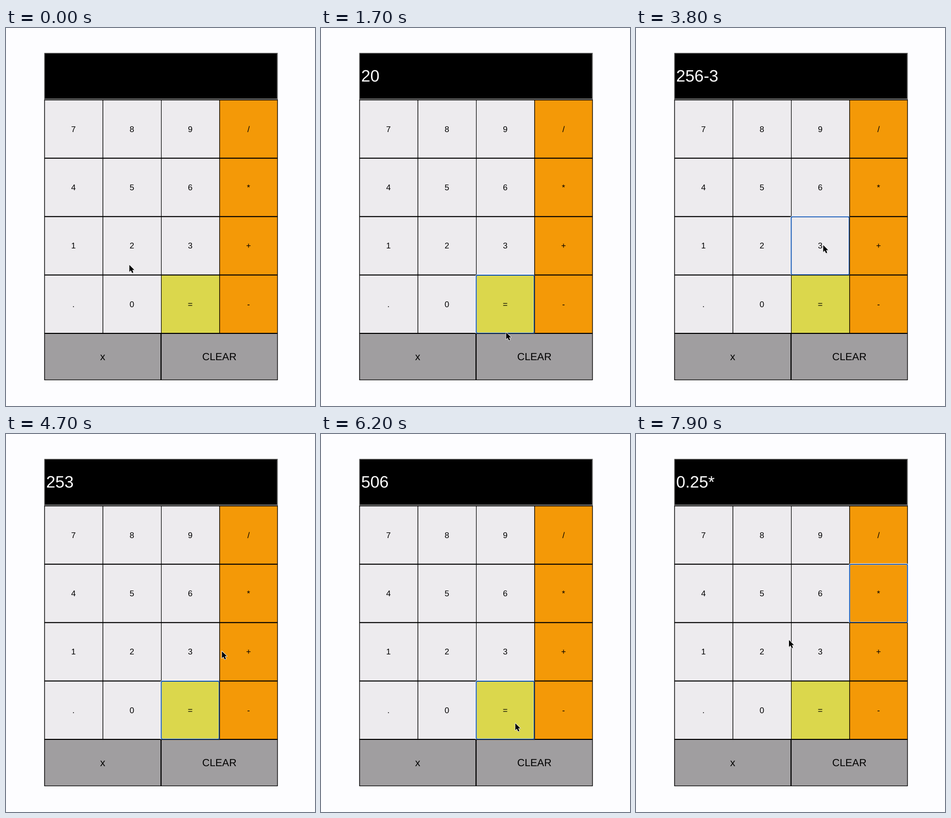
Write an HTML page that moves like this. It is 600 px wide and 734 px high and loops after 8 s.

```html
<!DOCTYPE html>
<html>
<head>
<meta charset="utf-8">
<title>Calculator</title>
<style>
  html, body { margin: 0; width: 100%; height: 100%; overflow: hidden; background: #fdfdff; }
  svg {
    display: block; width: 600px; height: 734px;
    font: 16px "Liberation Sans", Arial, sans-serif; text-rendering: geometricPrecision;
  }
  .label { text-anchor: middle; }
  .ring { fill: none; visibility: hidden; }
</style>
</head>
<body>
<svg id="stage" viewBox="0 0 600 734">
  <path d="M74.4 48.4H527.6V139H74.4Z" fill="#333"/>
  <path d="M527.6 48.4V139H74.4L76 137H526V50Z" fill="#777"/>
  <path d="M76 50H526V137H76Z"/>
  <text id="display" x="78" y="104" font-size="32" fill="#fff"></text>
  <path d="M74.4 139H527.6V683.7H74.4Z"/>
  <g id="keys"></g>
  <g id="cursor">
    <path d="M1 2V15L4 12.3 6.3 17.4 8.7 16.4 6.5 11.5H10.5Z" fill="#000" opacity=".15"/>
    <path d="M0 0V13.4L3 10.6 5.3 15.8 7.8 14.7 5.6 9.7H9.7Z" stroke="#fff" stroke-width="1.6" stroke-linejoin="round" paint-order="stroke"/>
  </g>
</svg>
<script>
const LOOP = 8000, STEP = 100;
const $ = id => document.getElementById(id);
const keys = {};

function add(parent, tag, attrs, text = '') {
  const el = document.createElementNS('http://www.w3.org/2000/svg', tag);
  for (const name in attrs) el.setAttribute(name, attrs[name]);
  el.textContent = text;
  return parent.appendChild(el);
}

function box(parent, x, y, width, height, attrs) {
  return add(parent, 'rect', { x, y, width, height, ...attrs });
}

// Later keys cover the outer part of an earlier key's focus ring.
function addKey(name, x, y, right, bottom, fill, size, end = 0) {
  const w = right - x, h = bottom - y, cx = x + w / 2, cy = y + h / 2;
  const g = add($('keys'), 'g', {});
  box(g, x, y, w, h, {});
  box(g, x + 1.1, y + 1, w - 1.1 - end, h - 2, { fill });
  const ring = add(g, 'g', { class: 'ring' });
  box(ring, x, y, w, h, { rx: 3, stroke: '#fff', 'stroke-width': 3 });
  box(ring, x + .4, y + .4, w - .8, h - .8, { rx: 2.5, stroke: '#1054b4', 'stroke-width': 1.8 });
  add(g, 'text', { class: 'label', x: cx, y: cy + size * .345, 'font-size': size }, name);
  keys[name] = { ring, x: cx + 5, y: cy - 1 };
}

const colX = i => 74.4 + 113.3 * i;
const rowY = j => 139.4 + 113.4 * j;
[...'789/456*123+.0=-'].forEach((name, n) => {
  const i = n % 4, j = n >> 2;
  const fill = i === 3 ? '#f49907' : name === '=' ? '#dbd74c' : '#edebee';
  addKey(name, colX(i), rowY(j), colX(i + 1), rowY(j + 1), fill, 16, i === 3 ? 1 : 0);
});
addKey('x', colX(0), rowY(4), colX(2), 683.7, '#a09ea0', 20, 1);
addKey('CLEAR', colX(2), rowY(4), colX(4), 683.7, '#a09ea0', 20, 1);

// Time, key pressed, resulting display
const presses = [
  [300, '1', '1'], [500, '0', '10'], [800, '*', '10*'], [1000, '2', '10*2'], [1200, '=', '20'],
  [1900, 'CLEAR', ''], [2200, '2', '2'], [2400, '5', '25'], [2500, '5', '255'],
  [2900, 'x', '25'], [3200, '6', '256'], [3500, '-', '256-'], [3700, '3', '256-3'], [4200, '=', '253'],
  [5000, '*', '253*'], [5500, '2', '253*2'], [6000, '=', '506'], [6600, 'CLEAR', ''],
  [7200, '0', '0'], [7300, '.', '0.'], [7400, '2', '0.2'], [7500, '5', '0.25'], [7700, '*', '0.25*']
];

// The pointer visits each pressed key, plus a few places in between.
const path = presses.filter(([t]) => t !== 5500)
  .map(([t, key]) => [t, keys[key].x, keys[key].y])
  .concat([
    [0, 239.5, 460], [1600, keys['='].x, keys['='].y], [1700, 359.5, 591], [2800, 189.5, 631],
    [3400, 475, 533], [3800, 363.5, 421.5], [4400, keys['='].x, keys['='].y],
    [5500, 245.5, 411], [5600, 245.5, 411], [6900, 285.5, 510], [7900, 297, 400], [LOOP, 250, 430]
  ])
  .sort((a, b) => a[0] - b[0]);

function pointerAt(t) {
  const n = path.findIndex(p => p[0] > t);
  const [t0, x0, y0] = path[n - 1], [t1, x1, y1] = path[n];
  const u = (t - t0) / (t1 - t0), e = u * u * (3 - 2 * u);
  return [x0 + (x1 - x0) * e, y0 + (y1 - y0) * e];
}

const lastPress = t => presses.filter(p => p[0] <= t).pop();

function draw(now) {
  const t = Math.floor(now % LOOP / STEP) * STEP;
  const focused = lastPress(t), shown = lastPress(t - STEP);
  for (const name in keys)
    keys[name].ring.style.visibility = focused && focused[1] === name ? 'visible' : 'hidden';
  $('display').textContent = shown ? shown[2] : '';
  $('cursor').setAttribute('transform', `translate(${pointerAt(t)})`);
}

const start = performance.now();
function tick() {
  draw(performance.now() - start);
  requestAnimationFrame(tick);
}
tick();
</script>
</body>
</html>
```
